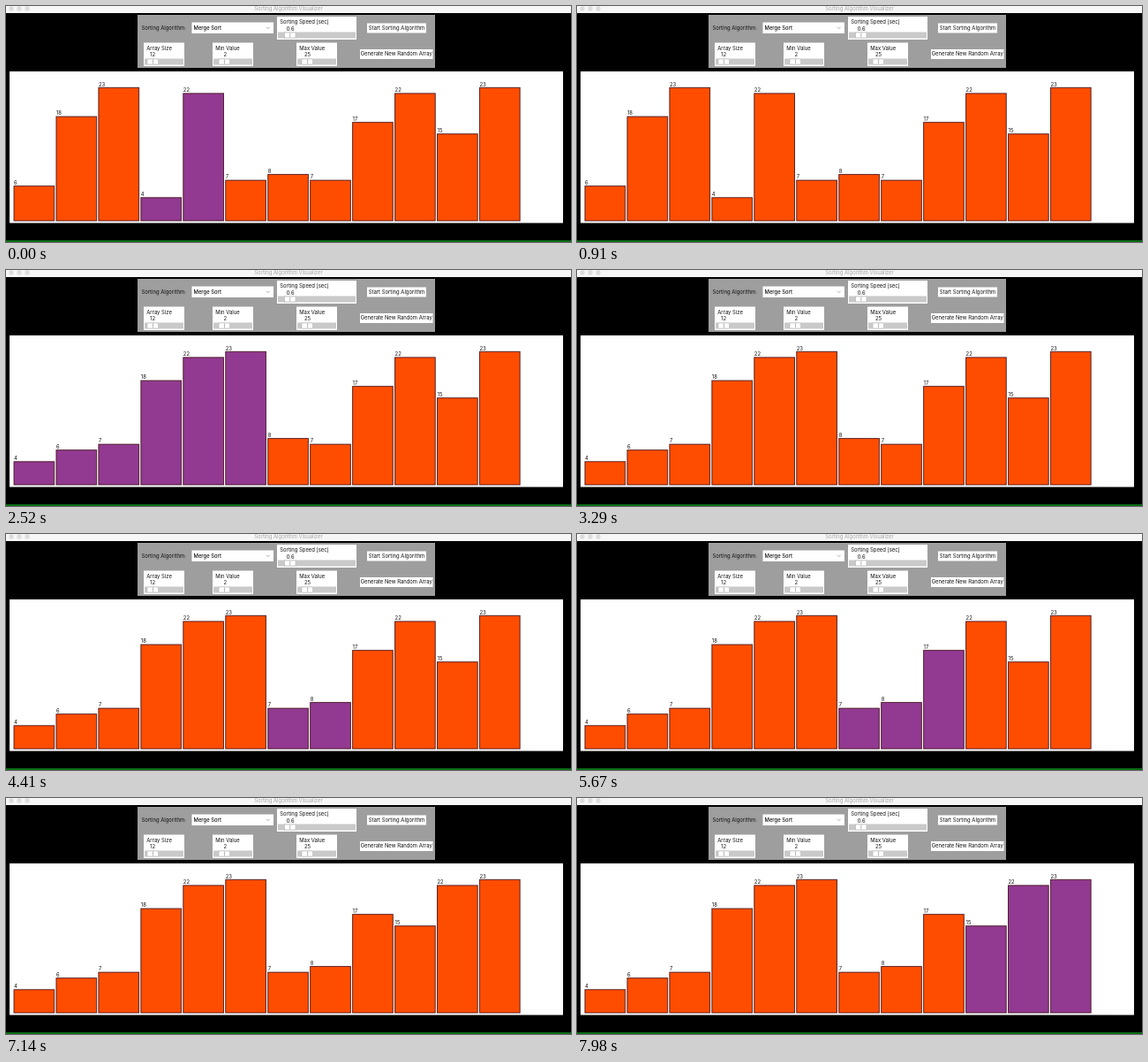
An HTML page that plays this animation: 640 by 267 pixels, repeating every 8 s.

```html
<!DOCTYPE html>
<html lang="en">
<head>
<meta charset="utf-8">
<title>Sorting Algorithm Visualizer</title>
<style>
  html, body { margin: 0; width: 100%; height: 100%; overflow: hidden; background: #000; }
  svg { display: block; width: 100vw; height: 100vh; }
  text { font: 5.9px Inter, "Open Sans", sans-serif; fill: #111; white-space: pre; }
</style>
</head>
<body>
<svg id="stage" viewBox="0 0 640 267"></svg>
<script>
const stage = document.getElementById('stage');

function add(tag, attrs, content) {
  const el = document.createElementNS('http://www.w3.org/2000/svg', tag);
  for (const key in attrs) el.setAttribute(key, attrs[key]);
  if (content !== undefined) el.textContent = content;
  return stage.appendChild(el);
}
const rect = (x, y, width, height, fill, more) => add('rect', { x, y, width, height, fill, ...more });
const label = (x, y, content, more) => add('text', { x, y, ...more }, content);

function button(x, y, w, content) {
  rect(x, y, w, 11, '#fff');
  label(x + w / 2, y + 7.4, content, { 'text-anchor': 'middle' });
}

function slider(x, y, w, h, name, value, valueX, thumbX) {
  rect(x, y, w, h, '#fff');
  label(x + 3.3, y + 8.1, name);
  label(valueX, y + 15.8, value);
  const top = y + h - 8.5;
  rect(x + 1, top, w - 2, 7, '#c9c9c9');
  rect(thumbX, top + 0.5, 12.5, 6, '#fff', { stroke: '#aaa', 'stroke-width': 0.5 });
  rect(thumbX + 6, top + 1, 0.7, 5, '#999');
}

// Window chrome
rect(0, 0, 640, 267, '#000');
rect(0, 0, 640, 8, '#f6f6f6');
for (const cx of [6, 15, 24]) add('circle', { cx, cy: 3, r: 2.7, fill: '#dcdcdc' });
label(320, 5.3, 'Sorting Algorithm Visualizer', { 'text-anchor': 'middle', style: 'fill:#a6a6a6' });
rect(0, 265, 640, 2, '#0a6a14');

// Control panel
rect(149, 10, 337, 60, '#9e9e9e');
label(153.5, 26.6, 'Sorting Algorithm:');
rect(210.5, 18.5, 92.5, 12.5, '#fff');
label(212.5, 26.8, 'Merge Sort', { 'font-weight': 500, style: 'font-weight:500' });
add('path', { d: 'M295 23.8l1.8 1.8l1.8-1.8', fill: 'none', stroke: '#888', 'stroke-width': 0.7 });
slider(307, 12, 90, 26, 'Sorting Speed [sec]', '0.6', 317.8, 315.5);
button(409, 19.5, 67, 'Start Sorting Algorithm');
slider(156, 41.5, 46, 26.5, 'Array Size', '12', 163, 160);
slider(234, 41.5, 46, 26.5, 'Min Value', '2', 246.5, 241);
slider(329, 41.5, 46, 26.5, 'Max Value', '25', 338, 335);
button(401, 49, 82.5, 'Generate New Random Array');

// Chart
rect(4, 74, 627, 171.5, '#fff');
const BASE = 243, UNIT = 6.55, PITCH = 47.95;
const ORANGE = '#ff4d00', PURPLE = '#923a91';
const start = [6, 18, 23, 4, 22, 7, 8, 7, 17, 22, 15, 23];
const bars = start.map((_, i) => {
  const x = 9 + i * PITCH;
  return {
    box: rect(x, 0, 45.7, 0, ORANGE, { stroke: '#401018', 'stroke-opacity': 0.85, 'stroke-width': 1 }),
    tag: label(x, 0, '')
  };
});

// Each merged range is lit, then released.
const merges = [[3, 5], [3, 6], [0, 6], [6, 8], [6, 9], [9, 11], [9, 12]];
const switches = [630, 1260, 1890, 2520, 3150, 3780, 4480, 5110, 5740, 6300, 6860, 7490];
const LOOP = 8000;

const states = [];
let data = start;
for (const [lo, hi] of merges) {
  const sorted = data.slice(lo, hi).sort((a, b) => a - b);
  data = [...data.slice(0, lo), ...sorted, ...data.slice(hi)];
  states.push({ data, lo, hi }, { data, lo: 0, hi: 0 });
}

let shown = -1;
function draw(ms) {
  const step = switches.filter(s => s <= ms).length;
  if (step === shown) return;
  shown = step;
  const { data, lo, hi } = states[step];
  bars.forEach(({ box, tag }, i) => {
    const height = data[i] * UNIT, y = BASE - height;
    box.setAttribute('y', y);
    box.setAttribute('height', height);
    box.setAttribute('fill', i >= lo && i < hi ? PURPLE : ORANGE);
    tag.setAttribute('y', y - 1.7);
    tag.textContent = data[i];
  });
}

const origin = performance.now();
function tick() {
  draw((performance.now() - origin) % LOOP);
  requestAnimationFrame(tick);
}
tick();
</script>
</body>
</html>
```
